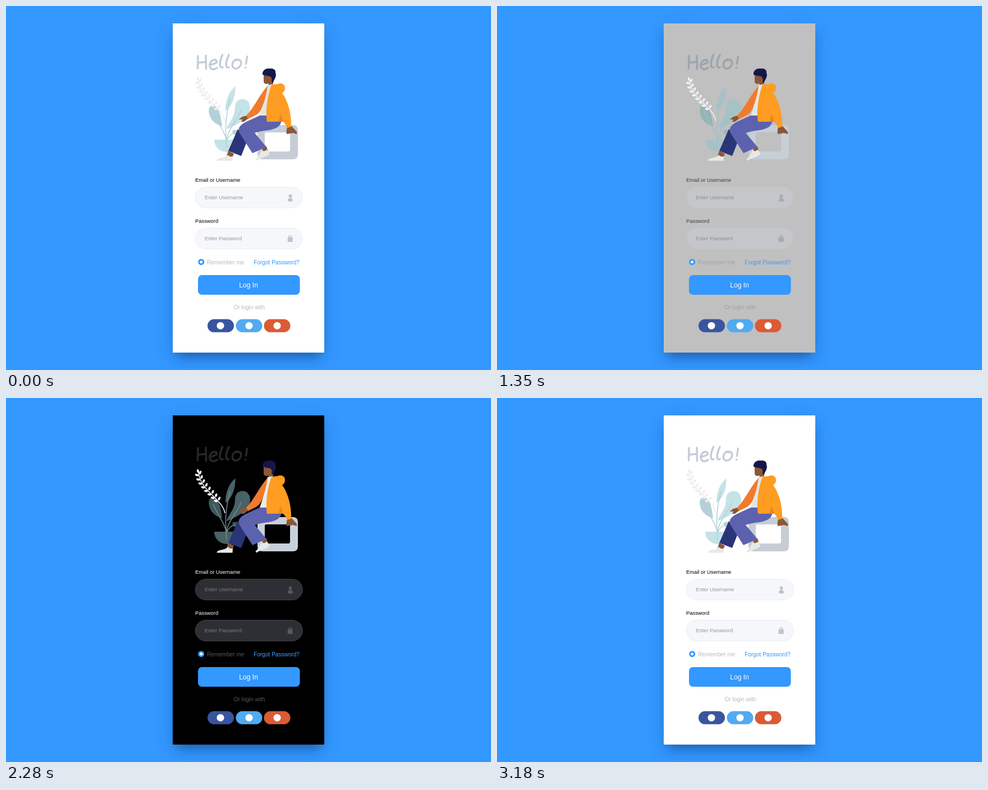
Recreate the animation shown at these times as an HTML page. Size 864x648 px, loop 3210 ms.

```html
<!DOCTYPE html>
<html lang="en">
<head>
<meta charset="utf-8">
<title>Login theme switch</title>
<style>
  html, body { margin: 0; width: 100%; height: 100%; overflow: hidden; background: #3398ff; }
  .card {
    position: absolute; left: 297px; top: 31px; width: 270px; height: 586px;
    background: var(--card);
    box-shadow: 0 14px 18px -8px rgba(8, 40, 95, .42), 0 10px 32px rgba(10, 50, 120, .17);
  }
  svg { position: absolute; left: 0; top: 0; }
  text { font-family: "Liberation Sans", Arial, sans-serif; font-size: 10.05px; }
  .label { font-size: 9.4px; fill: var(--label); }
  .hint { font-size: 9.4px; fill: var(--hint); }
  .muted { fill: var(--muted); }
  .field { fill: var(--field); stroke: var(--border); }
  .icon { fill: var(--icon); }
  .hello { fill: none; stroke: var(--hello); stroke-width: 3.5; stroke-linecap: round; stroke-linejoin: round; }
  .stems { fill: none; stroke: var(--stem); stroke-width: 1.5; stroke-linecap: round; }
  .sprig { fill: var(--sprig); }
  .sprig path { fill: none; stroke: var(--sprig); stroke-width: 1.5; }
  .leaf { fill: var(--leaf); }
  .shade { fill: var(--shade); }
  .skin { fill: #8b5639; }
  .shoe { fill: #e8e8e8; }
</style>
</head>
<body>
<div class="card"></div>
<svg width="864" height="648" viewBox="0 0 864 648">
  <g class="hello" role="img" aria-label="Hello!">
    <path d="M342 89L341.500 111M341.500 101L356 99.500M356 88.500L356.500 112"/>
    <path d="M362.500 104.500Q371 104 375.500 100Q375 95 370 96C363 98 361 107 365 111C368 114 373 112 376 110"/>
    <path d="M385.500 87C382 95 380.500 102 381.500 107Q382.500 110.500 386 109"/>
    <path d="M397 87C393 95 391.500 102 392.500 107Q393.500 110.500 397 109"/>
    <path d="M412 95C403 96 401 107 406 110.500C413 114 420 106 418.500 99Q417 94.500 410.500 96.500"/>
    <path d="M429.500 90L427.500 103M426.500 109.700L426.600 109.800"/>
  </g>

  <g id="plant">
    <path class="shade" d="M385 214C375 211 364 205 361.500 190C360 180 365 175 371 177C380 180 383 199 385 214Z"/>
    <path class="leaf" d="M391 187C390 172 396 153 408.500 143C409 157 405 176 391 187Z"/>
    <path class="leaf" d="M393 219C396 207 408 199 408 180C408 169 417 164 425 166C433 168 437 178 434 187C430 201 412 212 393 219Z"/>
    <path class="shade" d="M403 223C408 218 415 221 416 229C410 232 404 229 403 223Z"/>
    <path class="leaf" d="M371 238H421C420 253 408 260 394 260C382 260 371 252 371 238Z"/>
    <g class="stems">
      <path d="M393 252C391 227 389 206 399 166M392 237C390 223 378 211 369 189M393 238C395 220 411 205 419 186M394 238Q398 228 408 226"/>
    </g>
  </g>
  <g class="sprig" id="sprig"><path d="M343 132C345 164 386 180 390 205"/></g>

  <path fill="var(--stool)" fill-rule="evenodd" d="M457 212H511Q520 212 520 221V264Q520 273 511 273H457Q448 273 448 264V221Q448 212 457 212ZM464 225Q461 225 461 228V256Q461 259 464 259H503Q506 259 506 256V228Q506 225 503 225Z"/>

  <g id="person">
    <path class="skin" d="M459 121L474 119L477 131L475 143L467 143L468 138C463 140 459 138 459 134Z"/>
    <path fill="#15164a" d="M457 122C456 115 463 110 470 111.500C477 110 481 115 480 119C483 124 478 131 475 137L473 135C475 129 472 125 469 125L459 123Z"/>
    <path fill="var(--shirt)" d="M466 141L475 139L470 168L465 198H451C458 179 462 160 466 141Z"/>
    <path class="skin" d="M430 195L421 197L414.500 202L421 202L419 206L424 206L432 200Z"/>
    <path fill="#f27a2c" d="M466 142C464 158 460 171 456 181C452 191 447 194 431 201L428 195C442 181 451 159 466 142Z"/>
    <path class="skin" d="M396 258L406 263L403 270L393 267Z"/>
    <path class="skin" d="M456 253L464 250L467 259L459 262Z"/>
    <path class="shoe" d="M375.500 275.500C376 269 390 272 395 265Q399 270 404 267.500L403.500 275.500Z"/>
    <path class="shoe" d="M444.500 273C449 269 453 262 455.500 257Q460 260 465 255.500L469.500 263C466 269 456 269 446 275.500Z"/>
    <path fill="#2a3578" d="M413 219L430 239L419 267L396 258Z"/>
    <path fill="#5d62af" d="M452 195H490V207C488 215 480 219 468 221Q452 223 443 226L464 251L439 262L416 226C411 215 421 210 428 206Z"/>
    <path class="skin" d="M501 215L508 213L518 224V228L511 226L500 228L499.500 223Z"/>
    <path fill="#ff9c22" d="M473 140L484 139C490 136 497 139 497 146Q497 152 492 155C501 167 509 190 508 215L501 217Q498 210 494 206H465C462 190 465 162 473 140Z"/>
    <path fill="#ed8420" d="M489 192L485.500 206H494Z"/>
  </g>

  <text class="label" x="337" y="313">Email or Username</text>
  <rect class="field" x="337.300" y="322.500" width="191" height="37" rx="18.500"/>
  <text class="hint" x="354" y="344">Enter Username</text>
  <g class="icon">
    <circle cx="506.500" cy="338.200" r="2.900"/>
    <path d="M502.300 348V345.500Q502.300 341.500 506.500 341.500T510.700 345.500V348Z"/>
  </g>

  <text class="label" x="337" y="386">Password</text>
  <rect class="field" x="337.300" y="395.500" width="191" height="37" rx="18.500"/>
  <text class="hint" x="354" y="417">Enter Password</text>
  <rect class="icon" x="501.700" y="412" width="9" height="8" rx="1"/>
  <path d="M503.700 413V411.500a2.500 2.500 0 0 1 5 0V413" fill="none" stroke="var(--icon)" stroke-width="1.500"/>

  <circle cx="347.700" cy="455.700" r="4" fill="#fff" stroke="#3398ff" stroke-width="3"/>
  <text class="muted" x="358" y="459.500">Remember me</text>
  <text x="441.300" y="459.500" fill="var(--link)">Forgot Password?</text>

  <rect x="342" y="479" width="181.500" height="35" rx="7" fill="#3398ff"/>
  <text x="415.300" y="500.500" fill="#fff" style="font-size:12.1px">Log In</text>
  <text class="muted" x="405.500" y="540">Or login with</text>

  <g id="social">
    <rect x="359" y="557.500" width="47" height="23.300" rx="11.650" fill="#3a559f"/>
    <rect x="409.500" y="557.500" width="47" height="23.300" rx="11.650" fill="#50abf1"/>
    <rect x="459.500" y="557.500" width="47" height="23.300" rx="11.650" fill="#dc5a34"/>
    <g fill="#fff">
      <circle cx="382" cy="569.200" r="6.500"/>
      <circle cx="433" cy="569.200" r="6.500"/>
      <circle cx="483" cy="569.200" r="6.500"/>
    </g>
  </g>
</svg>

<script>
const LOOP = 3210, FADE = 700, TO_DARK = 1110, TO_LIGHT = 2462;

// Each entry: light colour, dark colour.
const theme = {
  card: ['#ffffff', '#000000'],
  label: ['#000000', '#ffffff'],
  hint: ['#969696', '#7b7b7d'],
  muted: ['#bababa', '#57575a'],
  link: ['#3398ff', '#4a9bff'],
  field: ['#f5f7fb', '#2e2f35'],
  border: ['#e8eff6', '#414349'],
  icon: ['#bcc5cc', '#535b62'],
  hello: ['#c5cdd6', '#25272a'],
  leaf: ['#c5e2e7', '#486266'],
  shade: ['#b3d1d6', '#3e585c'],
  stem: ['#b2d2d7', '#718b8e'],
  sprig: ['#eeeeee', '#ffffff'],
  stool: ['#c6cdd5', '#c8d0d8'],
  shirt: ['#e4e4e4', '#e8ecec']
};

const channels = hex => [1, 3, 5].map(i => parseInt(hex.slice(i, i + 2), 16));
const colours = Object.entries(theme).map(([name, pair]) => [name, ...pair.map(channels)]);

const bezier = (t, a, b, c, d) => {
  const u = 1 - t;
  return u * u * u * a + 3 * u * u * t * b + 3 * u * t * t * c + t * t * t * d;
};

function easeInOut(x) {
  if (x <= 0) return 0;
  if (x >= 1) return 1;
  let low = 0, high = 1;
  for (let i = 0; i < 18; i++) {
    const mid = (low + high) / 2;
    if (bezier(mid, 0, .42, .58, 1) < x) low = mid; else high = mid;
  }
  return bezier(low, 0, 0, 1, 1);
}

function addSprigLeaf(x, y, angle) {
  const leaf = document.createElementNS('http://www.w3.org/2000/svg', 'ellipse');
  leaf.setAttribute('rx', 3.3);
  leaf.setAttribute('ry', 1.9);
  leaf.setAttribute('transform', `translate(${x} ${y}) rotate(${angle})`);
  document.getElementById('sprig').append(leaf);
}

addSprigLeaf(342, 130, 70);
for (let i = 0; i < 8; i++) {
  const t = .05 + i * .09;
  const x = bezier(t, 343, 345, 386, 390), y = bezier(t, 132, 164, 180, 205);
  addSprigLeaf(x - 3.6, y + .5, 15);
  addSprigLeaf(x + 2.6, y - 4, 110);
}

function draw(now) {
  const time = now % LOOP;
  const dark = easeInOut((time - TO_DARK) / FADE) - easeInOut((time - TO_LIGHT) / FADE);
  for (const [name, light, night] of colours) {
    const rgb = light.map((v, i) => Math.round(v + (night[i] - v) * dark));
    document.documentElement.style.setProperty('--' + name, `rgb(${rgb})`);
  }
  requestAnimationFrame(draw);
}
draw(performance.now());
</script>
</body>
</html>
```
